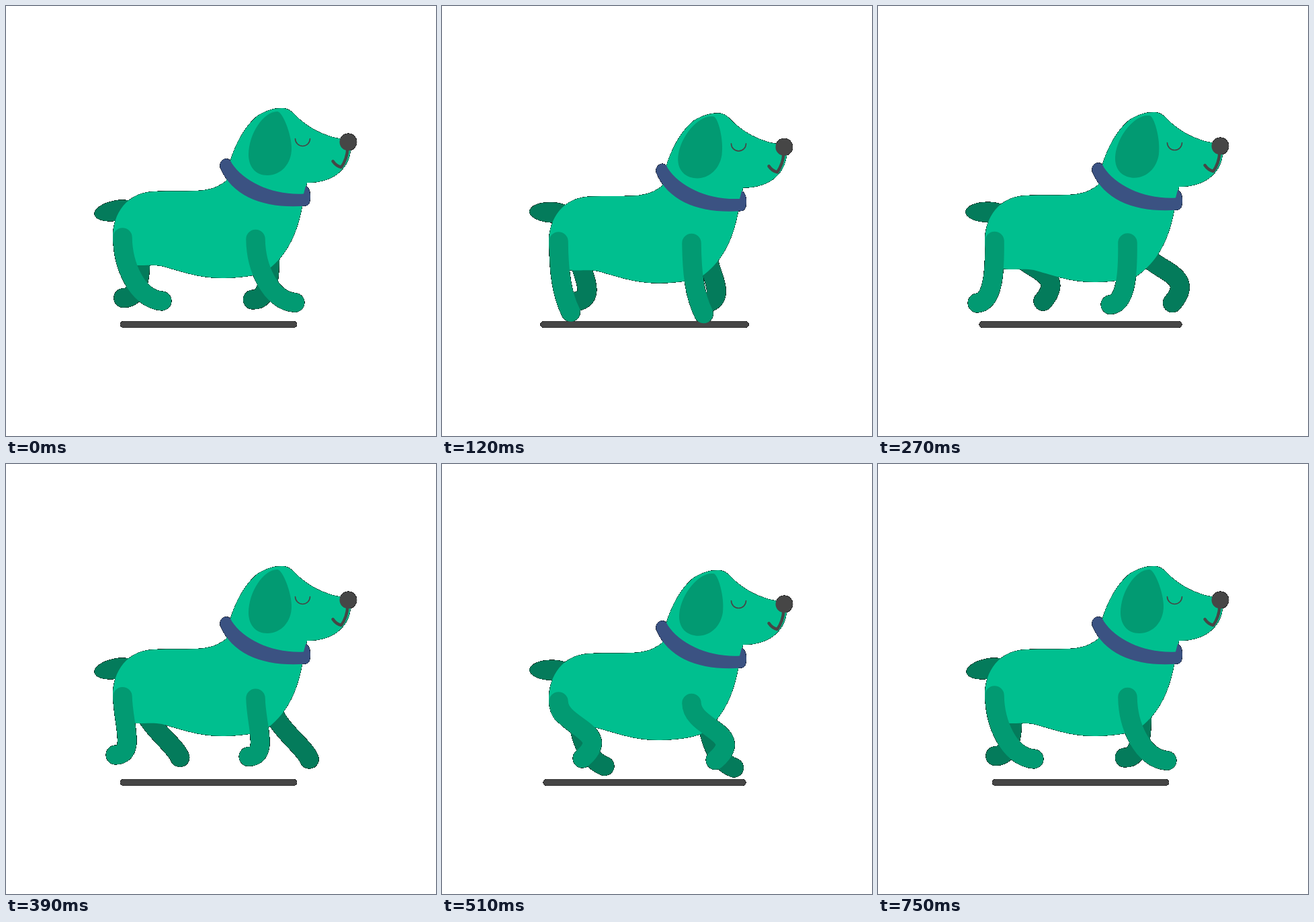
These frames come from a looping animation (640x640 px, 780 ms). An HTML page:

```html
<!DOCTYPE html>
<html lang="en">
<head>
<meta charset="utf-8">
<title>Walking dog</title>
<style>
  html, body { margin: 0; width: 100%; height: 100%; overflow: hidden; background: #fff; }
  svg { display: block; width: 640px; height: 640px; }
  .leg { fill: none; stroke-width: 28.5; stroke-linecap: round; }
  .far { stroke: #047b5b; }
  .near { stroke: #029a72; }
  .line { fill: none; stroke: #464646; stroke-linecap: round; stroke-linejoin: round; }
</style>
</head>
<body>
<svg viewBox="0 0 640 640">
  <!-- hard silhouette with dark edge pixels -->
  <filter id="edge" filterUnits="userSpaceOnUse" x="0" y="0" width="640" height="640" color-interpolation-filters="sRGB">
    <feComponentTransfer in="SourceAlpha" result="mask">
      <feFuncA type="linear" slope="20" intercept="-1.5"/>
    </feComponentTransfer>
    <feComposite in="SourceGraphic" in2="mask" operator="atop"/>
  </filter>
  <g filter="url(#edge)">
    <rect id="ground" y="469.3" height="9.4" rx="4.7" fill="#464646"/>
    <g id="dog">
      <g id="tail"><ellipse cx="164.500" cy="304.500" rx="33.500" ry="15" transform="rotate(-10 164.5 304.5)" fill="#047b5b"/></g>
      <path class="leg far"/>
      <path class="leg far" transform="translate(192.5 2.5)"/>
      <path fill="#00bf8f" d="M334 230C345 196 360 175 375 163C388 155 400 152 411 152
        C420 152 426 157 432 164C447 179 472 194 500 198L513 212C512 238 492 263 448 263L441 298
        C432 345 415 375 385 396C370 402 342 405 322 405C285 405 255 393 232 387C222 385 210 386 195 386
        C172 386 159 368 159 345C159 308 180 277 222 276C245 275 262 276 285 275C306 274 318 268 328 260Z"/>
      <path fill="#3b5282" d="M319 241C316 232 325 225 331 228C334 229 335 232 336 234
        C354 262 398 282 443 279.500L446 268C450 269 453 275 453 283C453 292 451 297 446 297.500
        C388 302 338 286 319 241Z"/>
      <path id="ear" fill="#029a72" d="M404 157C411 157 425 190 425 212C425 235 409 252 389 252
        C371 252 361 239 361 221C361 191 383 157 404 157Z"/>
      <path class="line" stroke-width="1.6" d="M430.500 197.500a11 11 0 0 0 22 0"/>
      <path class="line" stroke-width="4.500" d="M508.500 212C508 223 504 233 499 240C494 239 490 236 486.500 231"/>
      <circle cx="509.300" cy="202.500" r="12.800" fill="#464646"/>
      <path class="leg near"/>
      <path class="leg near" transform="translate(198 2.5)"/>
    </g>
  </g>
</svg>
<script>
const STEP = 30, STEPS = 26, CYCLE = 25;
const FAR_LEAD = 10, FAR_SHIFT = 27;

// key poses of one stride: when, lower bend of the leg, foot
const stride = [
  { at: 0, bend: [195, 436], foot: [232, 439] },
  { at: 5, bend: [175, 417], foot: [181, 448.5] },
  { at: 9, bend: [172, 434], foot: [148, 436] },
  { at: 13, bend: [194, 432], foot: [163, 433] },
  { at: 17, bend: [256, 391], foot: [209, 432] },
  { at: 21, bend: [249, 389], foot: [224, 435] }
];

const $ = id => document.getElementById(id);
const smooth = x => x * x * (3 - 2 * x);

// 0 at the top of a step, 1 at the bottom; the two steps mirror each other
function bobAt(f) {
  const u = f < 13 ? f : 26 - f;
  const end = f < 13 ? 0 : 1;
  return u < 6 ? smooth((u - end) / (6 - end)) : smooth((13 - u) / 7);
}

// cyclic Hermite spline through the key poses
function strideAt(f) {
  const n = stride.length;
  const key = i => stride[(i + n) % n];
  const time = i => key(i).at + CYCLE * Math.floor(i / n);
  let k = 0;
  while (f >= time(k + 1)) k++;
  const span = time(k + 1) - time(k), u = (f - time(k)) / span, s = smooth(u);
  const blend = (part, axis) => {
    const value = i => key(i)[part][axis];
    const slope = i => (value(i + 1) - value(i - 1)) / (time(i + 1) - time(i - 1)) * span;
    return value(k) * (1 - s) + value(k + 1) * s
      + slope(k) * u * (1 - u) ** 2 - slope(k + 1) * u * u * (1 - u);
  };
  return ['bend', 'foot'].map(part => [blend(part, 0) , blend(part, 1)]);
}

function setLegs(name, f, dx) {
  const hipY = 345.2 + 2.3 * Math.cos(2 * Math.PI * (f - 17.5) / CYCLE);
  const points = [[174, 386], ...strideAt(f)].map(([x, y]) => [x + dx, y]);
  const d = `M${173.5 + dx} ${hipY}C${points}`;
  document.querySelectorAll('.' + name).forEach(leg => leg.setAttribute('d', d));
}

function draw(f) {
  const bob = bobAt(f), half = 131.5 + 31.7 * bob;
  $('dog').setAttribute('transform', `translate(0 ${10 * bob})`);
  $('tail').setAttribute('transform', `rotate(${17 * bob} 185 298)`);
  $('ear').setAttribute('transform', `rotate(${12 * bob} 404 158)`);
  $('ground').setAttribute('x', 301.5 - half);
  $('ground').setAttribute('width', 2 * half);
  setLegs('near', f, 0);
  setLegs('far', (f + FAR_LEAD) % CYCLE, FAR_SHIFT);
}

const start = performance.now();
function tick() {
  const step = Math.floor((performance.now() - start) / STEP) % STEPS;
  draw(step % CYCLE);
  requestAnimationFrame(tick);
}
tick();
</script>
</body>
</html>
```
